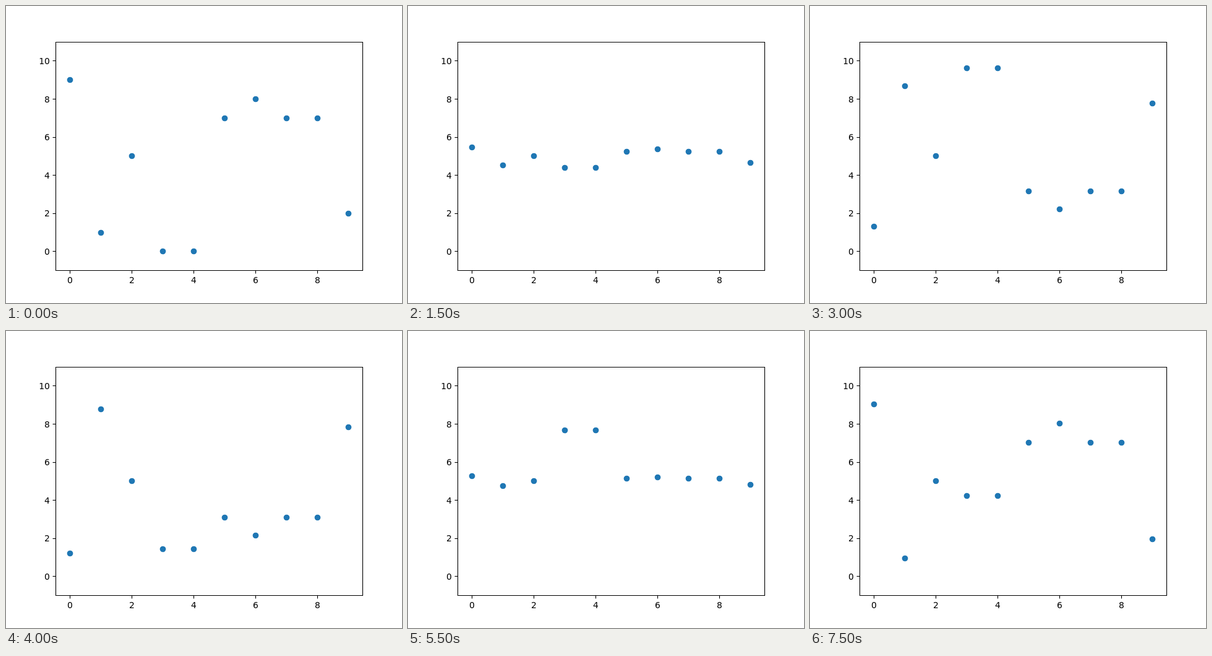
These frames come from a looping animation (640 px wide and 480 px high, 8 s). An HTML page:

```html
<!DOCTYPE html>
<html lang="en">
<head>
<meta charset="utf-8">
<title>Oscillating points</title>
<style>
  html, body { margin: 0; width: 100%; height: 100%; overflow: hidden; background: #fff; }
  svg { display: block; width: 640px; height: 480px; }
  text { font: 13.889px "DejaVu Sans", sans-serif; }
  .axes { fill: none; stroke: #000; stroke-width: 1.11; }
  .dots { fill: #1f77b4; }
</style>
</head>
<body>
<svg viewBox="0 0 640 480">
  <g class="axes"><path d="M80.5 58.5H576.5V427.5H80.5Z"/></g>
  <g class="labels"></g>
  <g class="dots"></g>
</svg>
<script>
const STEP_MS = 500, STEPS = 16;
const STIFFNESS = 0.17, CENTER = 5, SPAN = 10;
const DOT_RADIUS = 4.86;
const START_VALUES = [9, 1, 5, 0, 0, 7, 8, 7, 7, 2];

const xAt = v => 102.545 + 50.101 * v;
const yAt = v => 396.4 - 30.8 * v;
const snap = p => Math.round(p) + 0.5;

function add(parent, tag, attrs, text = '') {
  const el = document.createElementNS('http://www.w3.org/2000/svg', tag);
  for (const key in attrs) el.setAttribute(key, attrs[key]);
  el.textContent = text;
  return document.querySelector(parent).appendChild(el);
}

function addTickX(v) {
  add('.axes', 'path', { d: `M${snap(xAt(v))} 428V432.5` });
  add('.labels', 'text', { x: Math.round(xAt(v)) + 0.42, y: 448, 'text-anchor': 'middle' }, v);
}

function addTickY(v) {
  add('.axes', 'path', { d: `M80 ${snap(yAt(v))}H75.5` });
  add('.labels', 'text', { x: 70.84, y: Math.round(yAt(v) + 5.6), 'text-anchor': 'end' }, v);
}

for (let v = 0; v <= 8; v += 2) addTickX(v);
for (let v = 0; v <= 10; v += 2) addTickY(v);

// A spring towards the center, in a space that wraps around at SPAN.
function simulate(start) {
  const path = [start];
  for (let y = start, v = 0; path.length < STEPS;) {
    v -= STIFFNESS * (y - CENTER);
    y = (y + v + SPAN) % SPAN;
    path.push(y);
  }
  return path;
}

const dots = START_VALUES.map((start, i) => ({
  path: simulate(start),
  el: add('.dots', 'circle', { cx: snap(xAt(i)), r: DOT_RADIUS })
}));

function draw(ms) {
  const step = Math.floor(ms / STEP_MS) % STEPS;
  for (const { path, el } of dots) el.setAttribute('cy', snap(yAt(path[step])));
}

const began = performance.now();
function tick() {
  draw(performance.now() - began);
  requestAnimationFrame(tick);
}
tick();
</script>
</body>
</html>
```
